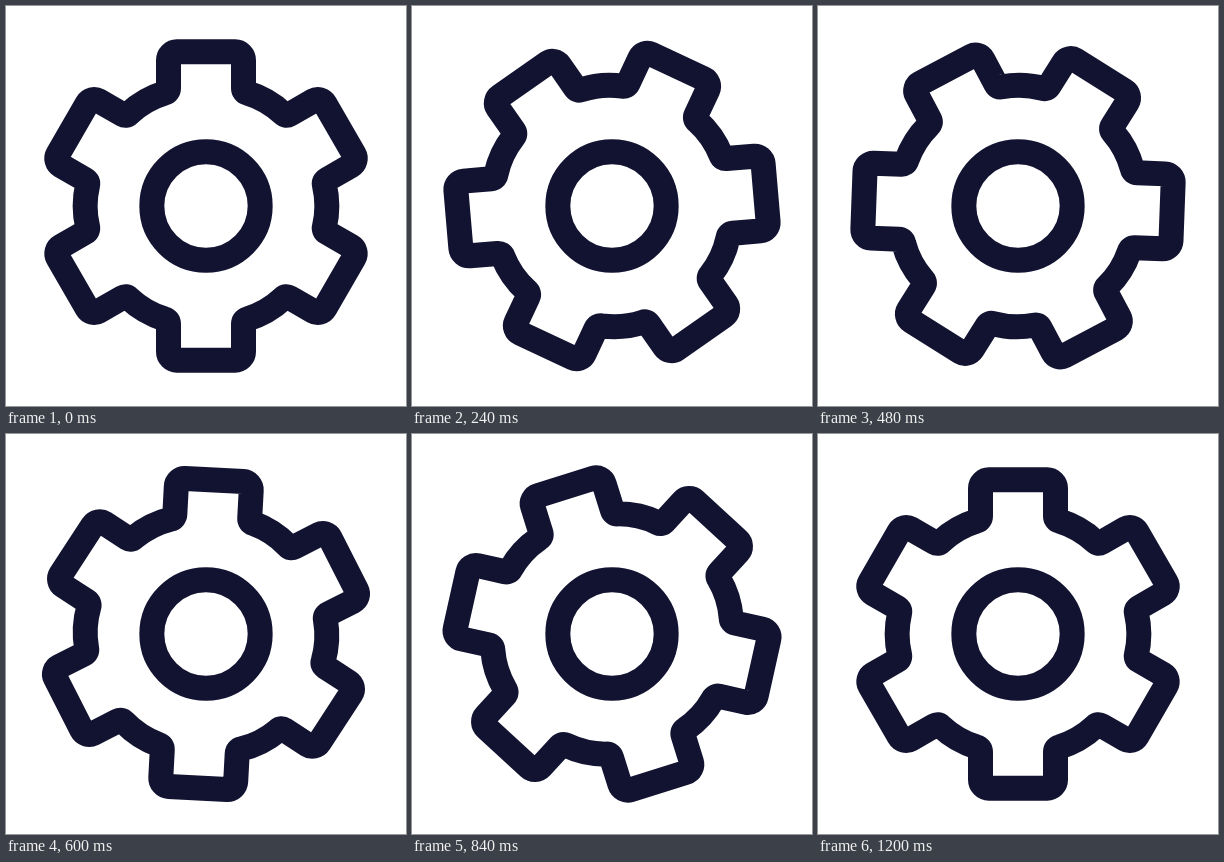
An HTML page that plays this animation: 400x400 px, repeating every 1.23 s.

```html
<!DOCTYPE html>
<html lang="en">
<head>
<meta charset="utf-8">
<title>Turning gear</title>
<style>
  html, body { margin: 0; width: 100%; height: 100%; overflow: hidden; background: #fff; }
  svg { display: block; width: 100%; height: 100%; }
  g { fill: none; stroke: #121331; stroke-width: 25; stroke-linejoin: round; }
</style>
</head>
<body>
<svg viewBox="-200 -200 400 400">
  <g>
    <path id="gear"/>
    <circle r="54.17"/>
  </g>
</svg>
<script>
  const LOOP = 1230, STEP = 30, TURN = 1200;
  const gear = document.getElementById('gear');

  // Point given in a tooth's own axes, turned to that tooth.
  function at(x, y, deg) {
    const a = deg * Math.PI / 180, c = Math.cos(a), s = Math.sin(a);
    return `${(x * c - y * s).toFixed(2)} ${(x * s + y * c).toFixed(2)}`;
  }

  function tooth(i) {
    const w = 37.5, top = -154.17, r = 8.33, foot = -114, rim = -120.25;
    const p = (x, y) => at(x, y, i * 60);
    const q = (x, y) => at(x, y, i * 60 + 60);
    const polar = deg => at(0, rim, i * 60 + deg);
    return `${i ? 'L' : 'M'}${p(-w, foot - 4)} L${p(-w, top + r)}
      A${r} ${r} 0 0 1 ${p(-w + r, top)} L${p(w - r, top)}
      A${r} ${r} 0 0 1 ${p(w, top + r)} L${p(w, foot - 4)}
      Q${p(w, foot)} ${polar(20.1)}
      A91 91 0 0 1 ${polar(39.9)}
      Q${q(-w, foot)} ${q(-w, foot - 4)}`;
  }

  // Eased progress on the curve cubic-bezier(x1, 0, x2, 1).
  function ease(x, x1 = 0.337, x2 = 0.38) {
    let lo = 0, hi = 1;
    for (let i = 0; i < 30; i++) {
      const s = (lo + hi) / 2, u = 1 - s;
      if (3 * x1 * s * u * u + 3 * x2 * s * s * u + s * s * s < x) lo = s;
      else hi = s;
    }
    return lo * lo * (3 - 2 * lo);
  }

  function draw(now) {
    const t = Math.max(0, now - start) % LOOP;
    const held = Math.floor((t + 0.01) / STEP) * STEP;
    const angle = 180 * ease(Math.min(1, held / TURN));
    gear.setAttribute('transform', `rotate(${angle.toFixed(3)})`);
    requestAnimationFrame(draw);
  }

  gear.setAttribute('d', [0, 1, 2, 3, 4, 5].map(tooth).join(' ') + 'Z');
  const start = performance.now();
  draw(start);
</script>
</body>
</html>
```
